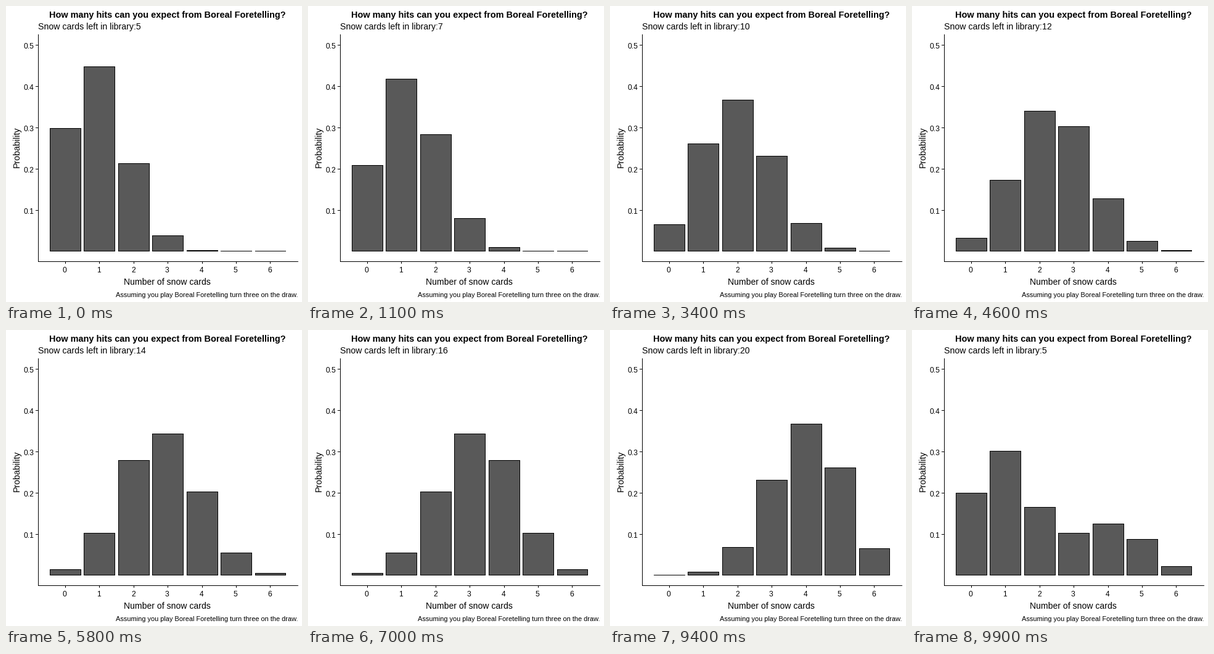
These frames come from a looping animation (480 by 480 pixels, 10000 ms). A matplotlib script:

```python
from math import comb

import matplotlib.pyplot as plt
from matplotlib.animation import FuncAnimation
from matplotlib.patches import Rectangle

SIZE = 480
FRAMES = 100
LIBRARY, DRAWS = 30, 6
STATES = list(range(5, 21))
BASE, SCALE = 397.4, 668.6      # y of zero and pixels per unit of probability
LEFT, STEP = 71.05, 55.41       # left edge of the first bar and bar spacing
FLOOR = round(BASE)

plt.rcParams["font.family"] = "Liberation Sans"
fig = plt.figure(figsize=(SIZE / 72, SIZE / 72), dpi=72, facecolor="white")
ax = fig.add_axes([0, 0, 1, 1])
ax.set_xlim(0, SIZE)
ax.set_ylim(SIZE, 0)
ax.axis("off")


def box(x, y, w, h, color="black"):
    return ax.add_patch(Rectangle((x, y), w, h, fc=color, lw=0, antialiased=False))


def label(x, y, text, size, ha="center", **style):
    return ax.text(x, y, text, size=size, ha=ha, va="baseline", color="black", **style)


def bar_x(pos):
    """Pixel column, counted in bar spacings from the first left edge."""
    return round(LEFT + STEP * pos)


def odds(snow):
    """Hypergeometric chance of each number of hits."""
    return [comb(snow, k) * comb(LIBRARY - snow, DRAWS - k) / comb(LIBRARY, DRAWS)
            for k in range(DRAWS + 1)]


def start(i):
    """First frame of the move into state i."""
    return min(7 * i - 3, 6 * i + 2)


def state_at(frame):
    """Bar heights and the number of snow cards for one frame."""
    i = sum(frame >= start(j) for j in range(1, len(STATES) + 1))
    now = STATES[i % len(STATES)]
    if i == 0:
        return odds(now), now
    t = min((frame - start(i) + 1) / 3, 1)
    pairs = zip(odds(STATES[i - 1]), odds(now))
    return [a + (b - a) * t for a, b in pairs], now


# Axes
box(52, 46, 1, 369)
box(52, 414, 422, 1)
for n in range(1, 6):
    y = round(BASE - SCALE * n / 10)
    box(48, y, 4, 1)
    label(45.5, y + 6, f"0.{n}", 12, ha="right")
for k in range(DRAWS + 1):
    x = bar_x(k + 0.45)
    box(x, 415, 1, 3)
    label(x - 0.7, 432, str(k), 12)

# Text
label(261.5, 19, "How many hits can you expect from Boreal Foretelling?", 14.5,
      weight="bold")
subtitle = label(51.5, 38, "", 14.1, ha="left")
label(261.6, 452, "Number of snow cards", 14)
label(22, 229, "Probability", 14.1, rotation=90, rotation_mode="anchor")
label(473.5, 472, "Assuming you play Boreal Foretelling turn three on the draw.",
      10.95, ha="right")

# Bars: a black outline rectangle with a grey one inside
outlines, fills = [], []
for k in range(DRAWS + 1):
    x, right = bar_x(k), bar_x(k + 0.9)
    outlines.append(box(x, FLOOR, right - x + 1, 1))
    fills.append(box(x + 1, FLOOR, right - x - 1, 0, "#595959"))


def draw(frame):
    heights, snow = state_at(frame)
    for p, outline, fill in zip(heights, outlines, fills):
        top = round(BASE - SCALE * p)
        outline.set_y(top)
        outline.set_height(FLOOR + 1 - top)
        fill.set_y(top + 1)
        fill.set_height(max(FLOOR - top - 1, 0))
    subtitle.set_text(f"Snow cards left in library:{snow}")
    return [*outlines, *fills, subtitle]


anim = FuncAnimation(fig, draw, frames=FRAMES, interval=100, repeat=True,
                     repeat_delay=0, blit=False)
plt.show()
```
